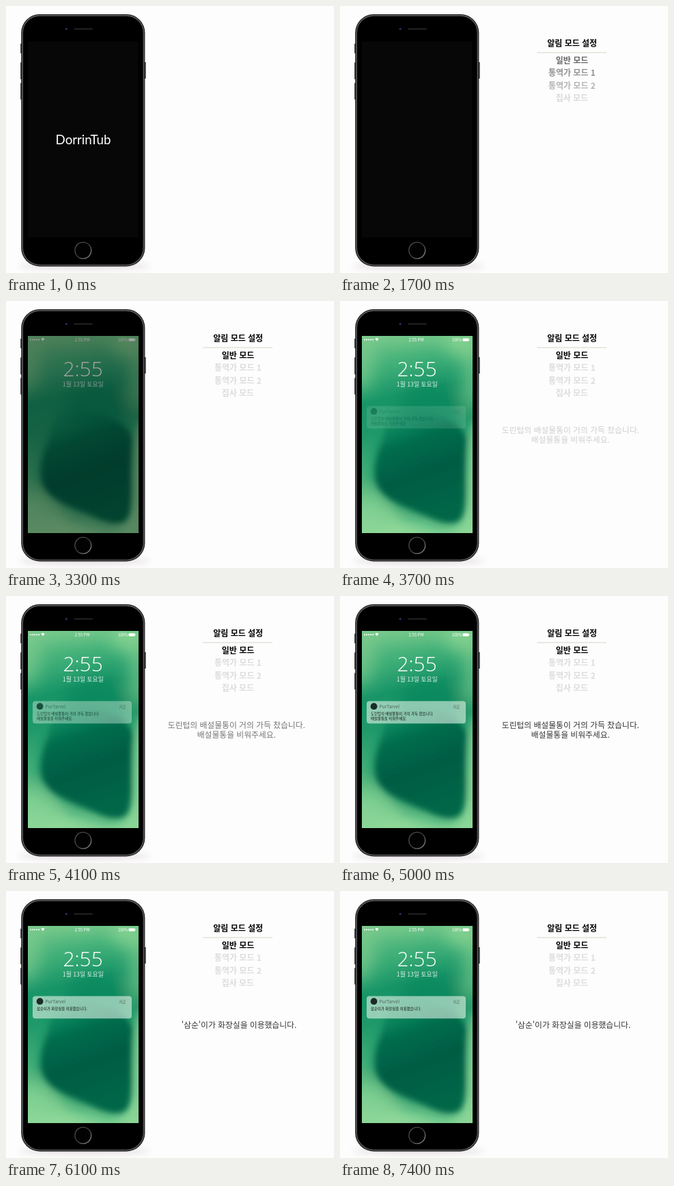
An HTML page that plays this animation: 480x390 px, repeating every 8 s.

```html
<!DOCTYPE html>
<html lang="ko">
<head>
<meta charset="utf-8">
<title>알림 모드 설정</title>
<style>
  html, body { margin: 0; width: 100%; height: 100%; overflow: hidden; background: #fdfdfd; }
  svg { display: block; width: 100vw; height: 100vh; }
  text { font-family: "Noto Sans CJK KR", "Noto Sans CJK", sans-serif; }
  .mid { text-anchor: middle; }
  .menu { font-size: 12px; font-weight: 700; }
  .message { font-size: 11.8px; font-weight: 300; fill: #333; }
  .status { font-size: 6px; fill: #fff; }
  .note { font-size: 5.4px; font-weight: 500; fill: #111; }
  .brand { font: 18.7px Lato, sans-serif; fill: #fff; }
  .clock { font: 300 29.8px "Open Sans", "Noto Sans", sans-serif; fill: #fff; }
  .date { font-size: 8.8px; font-weight: 300; fill: #fff; opacity: .85; }

  /* 1% of the loop is 80 ms */
  [class*="fade-"] { animation: 8s linear infinite both; }
  .fade-brand  { animation-name: brand; }
  .fade-title  { animation-name: title; }
  .fade-item1  { animation-name: item1; }
  .fade-item2  { animation-name: item2; }
  .fade-item3  { animation-name: item3; }
  .fade-item4  { animation-name: item4; }
  .fade-others { animation-name: others; }
  .fade-screen { animation-name: screen; }
  .fade-alert  { animation-name: alert; }
  .fade-first  { animation-name: first; }
  .fade-second { animation-name: second; }
  @keyframes brand  { 0%, 7.5% { opacity: 1 } 13.75%, 100% { opacity: 0 } }
  @keyframes title  { 0%, 15% { opacity: 0 } 21.25%, 100% { opacity: 1 } }
  @keyframes item1  { 0%, 16.6% { opacity: 0 } 24.5%, 100% { opacity: 1 } }
  @keyframes item2  { 0%, 17.1% { opacity: 0 } 26.75%, 100% { opacity: 1 } }
  @keyframes item3  { 0%, 18.2% { opacity: 0 } 28.75%, 100% { opacity: 1 } }
  @keyframes item4  { 0%, 19.8% { opacity: 0 } 30%, 100% { opacity: 1 } }
  @keyframes others { 0%, 32.5% { opacity: 1 } 38.75%, 100% { opacity: .13 } }
  @keyframes screen { 0%, 37% { opacity: 0 } 43.75%, 100% { opacity: 1 } }
  @keyframes alert  { 0%, 43.75% { opacity: 0 } 55%, 100% { opacity: 1 } }
  @keyframes first  { 0%, 70.5% { opacity: 1 } 75.5%, 100% { opacity: 0 } }
  @keyframes second { 0%, 70.5% { opacity: 0 } 75.5%, 100% { opacity: 1 } }
</style>
</head>
<body>
<svg viewBox="0 0 480 390">
  <defs>
    <linearGradient id="ring" x2="1" y2="1">
      <stop offset="0" stop-color="#555"/>
      <stop offset=".5" stop-color="#3a3a3a"/>
      <stop offset="1" stop-color="#999"/>
    </linearGradient>
    <linearGradient id="paper" x2=".12" y2="1">
      <stop offset="0" stop-color="#78c98b"/>
      <stop offset=".16" stop-color="#45b27a"/>
      <stop offset=".34" stop-color="#189568"/>
      <stop offset=".5" stop-color="#219a6b"/>
      <stop offset=".72" stop-color="#4db37c"/>
      <stop offset="1" stop-color="#8ed898"/>
    </linearGradient>
    <linearGradient id="leaf" x2=".3" y2="1">
      <stop offset="0" stop-color="#0c8a60" stop-opacity="0"/>
      <stop offset=".35" stop-color="#036e4d"/>
      <stop offset=".65" stop-color="#005c43"/>
      <stop offset="1" stop-color="#006647"/>
    </linearGradient>
    <filter id="soft" x="-50%" y="-50%" width="200%" height="200%"><feGaussianBlur stdDeviation="4"/></filter>
    <filter id="haze" x="-80%" y="-80%" width="260%" height="260%"><feGaussianBlur stdDeviation="12"/></filter>
    <clipPath id="display"><rect x="32" y="51" width="161.3" height="288"/></clipPath>
  </defs>

  <rect width="480" height="390" fill="#fdfdfd"/>
  <ellipse cx="115" cy="380" rx="96" ry="5" fill="#b9a9b2" opacity=".35" filter="url(#soft)"/>

  <g id="phone">
    <path d="M22.2 55v14M22.2 82.5v24.5M22.2 112.5v24M203.6 82v24" stroke="#2a2a2c" stroke-width="2"/>
    <rect x="22.2" y="12" width="181.2" height="368.4" rx="27" fill="#29292b"/>
    <rect x="24.4" y="14.1" width="176.8" height="364.2" rx="25" fill="#000" stroke="#6b6b6e" stroke-width="1.1"/>
    <rect x="27" y="16.5" width="171.6" height="359.4" rx="22.5" fill="#000"/>
    <rect x="32" y="52" width="161.3" height="286" fill="#070707"/>
    <circle cx="88.3" cy="33.6" r="1.9" fill="#161a34"/>
    <circle cx="88" cy="33.4" r=".8" fill="#46507c"/>
    <rect x="99.5" y="32.6" width="27.5" height="2" rx="1" fill="#242426"/>
    <circle cx="112.8" cy="357" r="11.9" fill="#020202" stroke="url(#ring)" stroke-width="1.4"/>
  </g>

  <text class="brand mid fade-brand" x="113" y="202">DorrinTub</text>

  <g class="fade-screen" clip-path="url(#display)">
    <rect x="32" y="51" width="162" height="288" fill="url(#paper)"/>
    <g filter="url(#haze)">
      <ellipse cx="30" cy="82" rx="20" ry="50" fill="#7cca8e" opacity=".75"/>
      <ellipse cx="113" cy="48" rx="80" ry="12" fill="#86cf90" opacity=".6"/>
      <ellipse cx="186" cy="62" rx="34" ry="20" fill="#8ed794" opacity=".8"/>
      <ellipse cx="195" cy="110" rx="15" ry="50" fill="#7ccb8d" opacity=".75"/>
      <ellipse cx="135" cy="160" rx="50" ry="36" fill="#078059" opacity=".6"/>
      <ellipse cx="34" cy="325" rx="30" ry="42" fill="#8cd898" opacity=".6"/>
      <path d="M60 200L46 265L95 315L160 332L184 300L180 210Z" fill="#168a60" opacity=".75"/>
    </g>
    <g filter="url(#soft)">
      <path d="M70 165C66 205 46 232 52 262C61 294 101 301 131 316C155 326 174 330 180 312C187 290 180 243 185 205C186 170 105 150 70 165Z" fill="url(#leaf)"/>
      <ellipse cx="195" cy="255" rx="5" ry="80" fill="#85cf94"/>
    </g>

    <g fill="#fff">
      <path d="M36 56.5h13" stroke="#fff" stroke-width="2.2" stroke-linecap="round" stroke-dasharray="0 3.05"/>
      <path d="M51.3 55.3q2.6-2.6 5.2 0l-2.6 3.2z"/>
      <rect x="179.5" y="54.5" width="9" height="4.2" rx=".8"/>
      <rect x="188.9" y="55.7" width=".8" height="1.8"/>
    </g>
    <text class="status mid" x="111.5" y="58.7">2:55 PM</text>
    <text class="status" x="164" y="58.7" style="font-size:5.5px">100%</text>
    <text class="clock mid" x="112.6" y="110.3">2:55</text>
    <text class="date mid" x="112.8" y="125">1월 13일 토요일</text>

    <g class="fade-alert">
      <rect x="39" y="153.6" width="145" height="32.6" rx="4" fill="#e4f3e8" opacity=".6"/>
      <circle cx="49.6" cy="161.2" r="4.9" fill="#1d2b28"/>
      <text x="57.5" y="163.8" font-size="6.6" fill="#4a665f">PurTarvel</text>
      <text x="165.5" y="163.9" font-size="5.2" fill="#4a665f">지금</text>
      <g class="note fade-first">
        <text x="45" y="173.5">도린텁의 배설물통이 거의 가득 찼습니다.</text>
        <text x="45" y="180.6">배설물통을 비워주세요.</text>
      </g>
      <text class="note fade-second" x="45" y="173.5">삼순이가 화장실을 이용했습니다.</text>
    </g>
  </g>

  <g class="menu mid">
    <g class="fade-title">
      <text x="339.7" y="58.9">알림 모드 설정</text>
      <path d="M288.5 68h101.5" stroke="#d6d2c8"/>
    </g>
    <text class="fade-item1" x="339.6" y="83.7">일반 모드</text>
    <g class="fade-others">
      <text class="fade-item2" x="339.4" y="102.2">통역가 모드 1</text>
      <text class="fade-item3" x="339.4" y="120.7">통역가 모드 2</text>
      <text class="fade-item4" x="339.4" y="138.6">집사 모드</text>
    </g>
  </g>

  <g class="message mid fade-alert">
    <g class="fade-first">
      <text x="337.3" y="192.7">도린텁의 배설물통이 거의 가득 찼습니다.</text>
      <text x="337.3" y="206.5">배설물통을 비워주세요.</text>
    </g>
    <text class="fade-second" x="341" y="199.8">'삼순'이가 화장실을 이용했습니다.</text>
  </g>
</svg>
</body>
</html>
```
